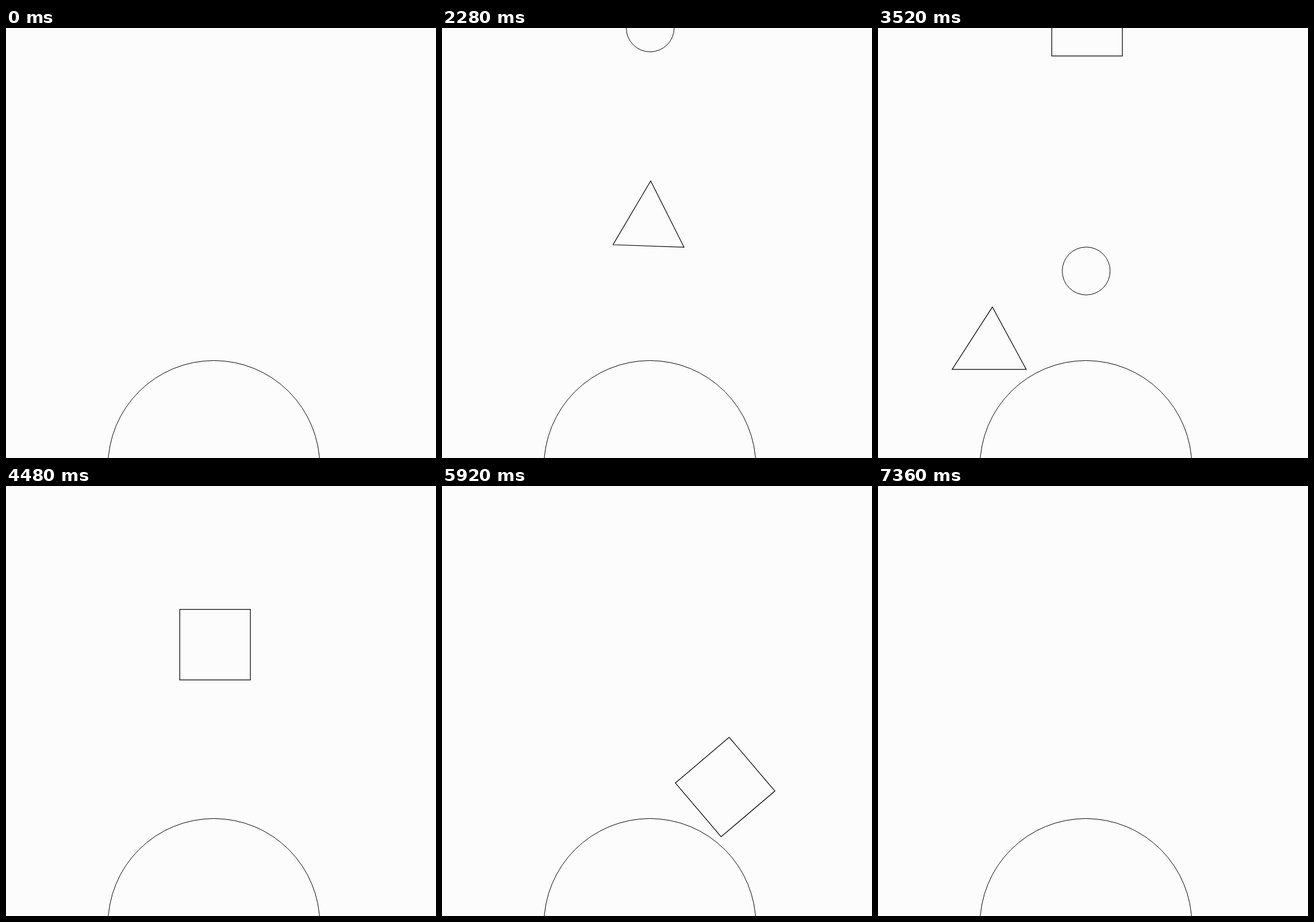
An HTML page for the animation above (8 s loop, 748 px wide and 748 px high).

```html
<!DOCTYPE html>
<html>
<head>
<meta charset="utf-8">
<style>
  html, body { margin: 0; height: 100%; overflow: hidden; background: #fcfcfc; }
  svg { display: block; width: 748px; height: 748px; }
  circle, path { fill: none; stroke: #000; stroke-width: 1.25; stroke-miterlimit: 10; }
  circle { stroke-width: 1; }
  #planet { fill: #fcfcfc; }
</style>
</head>
<body>
<svg viewBox="0 0 748 748">
  <circle id="ballA" r="41.65"/>
  <circle id="ballB" r="41.65"/>
  <path id="triangle" d="M2.5-75.4L-63 35.6L60.5 39.9Z"/>
  <path id="square" d="M-61.4-61.4H61.4V61.4H-61.4Z"/>
  <circle id="planet" cx="361.65" cy="762.8" r="184.3"/>
</svg>
<script>
// Time is counted in steps of 40 ms; speeds are per step.
const STEP = 40, LOOP = 200;

function place(id, x, y, angle = 0) {
  document.getElementById(id).setAttribute("transform", `translate(${x} ${y}) rotate(${angle})`);
}

// Rises from 0 to a slope of 1, turning around `when` over a span of about `spread`.
const ramp = (m, when, spread) => spread * Math.log1p(Math.exp((m - when) / spread));

function ball(id, n) {
  place(id, 362.15, 278.1 + 13.64 * (n - 24));
}

function triangle(n) {
  const m = n - 73.6;
  if (m < 0) return place("triangle", 360.5, 540.6 + 12 * m);
  const drag = ramp(m, 19.4, 3);
  place("triangle",
    360.5 - 11.71 * m + 6.5 * drag,
    540.6 - 2.4 * m + 14.48 * ramp(m, 11.2, 2),
    -8.45 * m + 2.3 * drag);
}

function square(n) {
  const m = n - 132.03;
  if (m < 0) return place("square", 363.7, 517 + 12.03 * m);
  const slip = ramp(m, 21.52, 3.5);
  place("square", 363.7 + 8.15 * m - 2.07 * slip, 517 + 10.2 * slip, 3.106 * m);
}

function draw() {
  const n = Math.floor(performance.now() / STEP) % LOOP;
  ball("ballA", n);
  ball("ballB", n - 53.4);
  triangle(n);
  square(n);
  requestAnimationFrame(draw);
}
draw();
</script>
</body>
</html>
```
